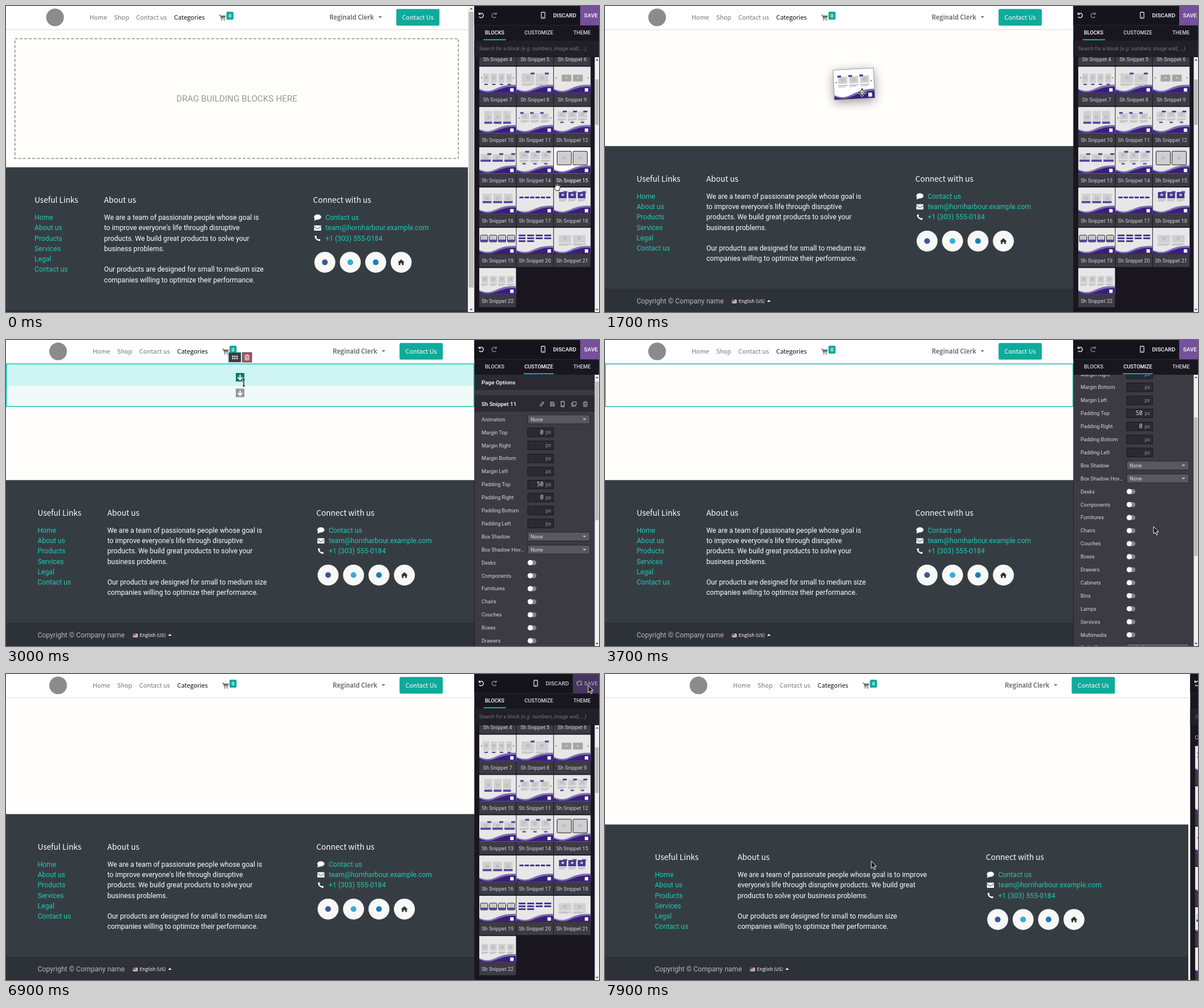
These frames come from a looping animation (1040x538 px, 8 s). An HTML page:

```html
<!DOCTYPE html>
<html lang="en">
<head>
<meta charset="utf-8">
<title>Website builder</title>
<style>
html, body { margin: 0; width: 100%; height: 100%; overflow: hidden; background: #fffefc; }
#stage { display: block; width: 100vw; height: 100vh; font-family: Roboto, "Liberation Sans", sans-serif; }
#stage text { white-space: pre; }
.alt { font-family: "Noto Sans CJK JP", "Noto Sans CJK SC", "Noto Sans CJK KR", "Noto Sans CJK TC", "Open Sans", sans-serif; }
.mono { font-family: "Noto Sans Mono", "DejaVu Sans Mono", monospace; }
</style>
</head>
<body>
<svg id="stage" viewBox="0 0 1040 538" preserveAspectRatio="none"></svg>
<script>
const LOOP = 8000, STEP = 100;
const TEAL = '#1dc9b7', BTN = '#0fab9a', BASE = '#3c3a43', BAR = '#2b2a32', FIELD = '#595762';
const stage = document.getElementById('stage');

// Drawing helpers
const rect = (x, y, w, h, fill, more = '') =>
  `<rect x="${x}" y="${y}" width="${w}" height="${h}" fill="${fill}" ${more}/>`;
const circle = (x, y, r, fill, more = '') => `<circle cx="${x}" cy="${y}" r="${r}" fill="${fill}" ${more}/>`;
const path = (d, fill, more = '') => `<path d="${d}" fill="${fill}" ${more}/>`;
const line = (d, color, w = 1, more = '') => path(d, 'none', `stroke="${color}" stroke-width="${w}" ${more}`);
const text = (x, y, s, size, fill, more = '') =>
  `<text x="${x}" y="${y}" font-size="${size}" fill="${fill}" ${more}>${s}</text>`;
const group = (x, y, body, more = '') => `<g transform="translate(${x} ${y}) ${more}">${body}</g>`;
const caret = (x, y, color, up = 0) => path(`M${x - 3.2} ${y + (up ? 1.5 : -1.5)}h6.4l-3.2 ${up ? -3.2 : 3.2}z`, color);
const view = (x, y, w, h, dy, body) =>
  `<svg x="${x}" y="${y}" width="${w}" height="${h}" viewBox="${x} ${y + dy} ${w} ${h}">${body}</svg>`;
const range = n => [...Array(n).keys()];
const mix = (a, b, k) => a + (b - a) * k;

// Keys are [time, ...values]; values run linearly between them
function track(keys, t) {
  const i = keys.findIndex(k => k[0] > t);
  if (i === 0) return keys[0].slice(1);
  if (i < 0) return keys[keys.length - 1].slice(1);
  const a = keys[i - 1], b = keys[i], k = (t - a[0]) / (b[0] - a[0]);
  return a.slice(1).map((v, j) => mix(v, b[j + 1], k));
}
const latest = (keys, t) => keys.filter(k => k[0] <= t).pop()[1];

// Timeline
const POINTER = [
  [300, 967, 318], [600, 945, 140], [800, 928, 196], [1000, 928, 196], [1300, 790, 165],
  [1600, 505, 153], [1700, 451, 152], [1900, 443, 135], [2100, 440, 131], [2300, 440, 131],
  [2400, 417, 78], [2500, 417, 78], [2600, 417, 75], [3000, 417, 75], [3400, 962, 328],
  [4100, 962, 328], [4400, 927, 369], [4600, 927, 369], [4900, 927, 391], [5100, 927, 391],
  [5400, 928, 415], [5500, 928, 415], [5900, 1002, 118], [6000, 1002, 118], [6300, 1021, 24],
  [6400, 1021, 24], [6500, 1021, 20], [6900, 1021, 20], [7400, 467, 329]
];
const SHAPE = [[0, 'grab'], [1100, 'move'], [1800, 'arrow'], [2600, 'resize'], [3100, 'arrow'],
  [4300, 'hand'], [5700, 'arrow'], [6300, 'hand'], [6800, 'arrow']];
const SCROLL = [[3400, 0], [3500, 54], [3600, 54], [3700, 125], [3800, 215], [3900, 290], [4000, 323.5]];

// Mouse pointers
const outline = 'stroke="#111" stroke-width="1" stroke-linejoin="round"';
const HEADS = 'M0-8l3 3.5h-6zM0 8l3-3.5h-6z';
const POINTERS = {
  arrow: path('M0 0V12.6L3 10L5 14.8L7.2 13.8L5.1 9.2H9Z', '#111', 'stroke="#fff" stroke-width="1"'),
  hand: group(-6, -7, path('M3 0C4 0 4.5.8 4.5 2V5.5L6 5.2 7.5 6 9 5.9 10.4 7 11.3 8V11L9.7 14.5H4L0 9.6C-.3 8.5 1 8 2 9V2C2 .8 2.2 0 3 0Z', '#fff', outline)
    + line('M6 6v3M8 6.4v3M10 7.2v2.4', '#111', .7)),
  grab: group(-5.5, -7, path('M3 13.6L0 8.5C0 7 1 6.7 2 7.6L1.2 3C1.2 1.7 2.7 1.6 3 2.8L3.8 5.6 4 1.2C4 0 5.4 0 5.7 1.2L6 5.4 7 1.7C7.3.6 8.7 1 8.5 2.2L8.1 6 9.5 3.8C10 2.8 11.3 3.4 10.9 4.6L9.7 9.5 8.7 13.6Z', '#fff', outline)),
  move: path(HEADS, '#111', 'stroke="#fff" stroke-width=".8"') + `<g transform="rotate(90)">${path(HEADS, '#111', 'stroke="#fff" stroke-width=".8"')}</g>`
    + circle(0, 0, 4, '#fff', outline) + line('M-2-1v3M0-2v4M2-1v3', '#111', .8),
  resize: line('M0-5V5', '#fff', 3.2) + path(HEADS, '#111', 'stroke="#fff" stroke-width=".7"') + line('M0-5V5', '#111', 1.5)
};

// Block thumbnails: count, width, top, height, and marks
// i icon, t/l tag at top right/left, b base bar, u tag below, n lines below,
// o outlined, p purple, d dark, g grey ground, a side arrows, r three rows
const BLOCKS = `3 16 13 11 ilba|3 13 13 13 i|3 14 10 18 ibg|2 22 13 13 itn|4 10 13 12 iba|3 15 12 11 itu
4 10.5 12 16 iua|2 22 12 16 itn|2 17 14 12 ida|3 13.5 7 23 ib|3 14.5 11 11 ilna|3 15 8 11 itnu
3 18 12 14 itb|3 16 8 13 itnu|2 25 7 24 io|3 15.5 11 17 ib|6 7.4 16 3 p|3 13.5 8 11 pint
4 12.8 13 12 iob|4 12 12 3 pr|2 22 13 13 in|4 12 14 12 in`.split(/[|\n]/).map(s => s.split(' '));

function card(x, y, w, h, has) {
  const mid = x + w / 2, purple = '#51429a', bar = (dx, dy, bw, bh, c = purple) => rect(x + dx, y + dy, bw, bh, c);
  let s = rect(x, y, w, h, has('p') ? '#46358f' : has('d') ? '#a5a5a5' : has('g') ? '#f3f3f3' : '#cfcfd1',
    has('o') ? 'rx="1.5" stroke="#222" stroke-width="1"' : '');
  if (has('i')) s += rect(mid - 2, y + h / 2 - 2.2, 4, 3.4, '#eee', 'stroke="#8d8d90" stroke-width=".6"') + circle(mid, y + h / 2 - .5, .7, '#777');
  if (has('t')) s += bar(w - 6, -1.5, 7, 3);
  if (has('l')) s += bar(-1, -2, 6, 3);
  if (has('b')) s += bar(0, h - 4, w, 3.4);
  if (has('n')) s += bar(0, h + 2, w, 1.3, '#aaaab0') + bar(0, h + 4.3, w * .75, 1.1, '#bbbbc0');
  if (has('u')) s += bar(w / 2 - 3, h + (has('n') ? 7 : 2), 6, 2.2);
  return s;
}

function thumb(i, ground) {
  const [n, w, y, h] = BLOCKS[i].map(Number), has = c => BLOCKS[i][4].includes(c);
  const gap = n > 5 ? 2 : 3, x0 = (64.4 - n * w - (n - 1) * gap) / 2;
  let s = rect(0, 0, 64.4, 46, has('g') ? '#cacaca' : ground);
  s += path('M0 39C9 43 17 44 27 39.5S47 31 64.4 32V46H0Z', '#7d6daf');
  s += path('M0 41C10 46 18 46 29 42S49 34 64.4 35.5V46H0Z', '#391f7c');
  for (const k of range(n)) {
    for (const j of range(has('r') ? (k < 2 ? 3 : 2) : 1)) s += card(x0 + k * (w + gap), y + j * 5, w, h, has);
  }
  if (has('a')) s += path('M5 18l-2 1.5 2 1.5zM59.5 18l2 1.5-2 1.5z', '#666');
  return s + rect(54.3, 37.8, 6, 6, '#fff');
}

// Page
const NARROW = ['We are a team of passionate people whose goal is', 'to improve everyone\'s life through disruptive',
  'products. We build great products to solve your', 'business problems.', '',
  'Our products are designed for small to medium size', 'companies willing to optimize their performance.'];
const WIDE = ['We are a team of passionate people whose goal is to improve', 'everyone\'s life through disruptive products. We build great',
  'products to solve your business problems.', '', 'Our products are designed for small to medium size',
  'companies willing to optimize their performance.'];

function header(p) {
  const { L, R } = p, nav = (x, s, c) => text(L + x, 24.3, s, 10.92, c, 'class="alt"');
  return rect(0, 0, p.W, 41, '#fff') + rect(0, 41, p.W, 1, '#e4e4e4') + rect(0, 42, p.W, 1, '#f6f5f4')
    + circle(L + 36, 20, 15.5, '#8b8b8b')
    + nav(96.5, 'Home', '#777') + nav(139.5, 'Shop', '#777') + nav(178.3, 'Contact us', '#777') + nav(244.8, 'Categories', '#111')
    + group(L + 323.5, 15, line('M0 .8H2.3L4.2 7.5H10.3', '#6f6f6f', 1.2) + path('M2.6 1.8H11.8L10.6 6H3.8Z', '#6f6f6f') + circle(4.8, 9.6, 1.1, '#6f6f6f') + circle(9.6, 9.6, 1.1, '#6f6f6f'))
    + rect(L + 336.5, 10, 12.5, 14, BTN, 'rx="2"') + text(L + 342.8, 20.2, '0', 8.2, '#fff', 'class="alt" font-weight="700" text-anchor="middle"')
    + text(R - 193, 24.3, 'Reginald Clerk', 10.92, '#737373', 'class="alt" font-weight="700"') + caret(R - 104, 19.5, '#737373')
    + rect(R - 75.8, 5.2, 75.8, 29.4, BTN, 'rx="2.5"') + text(R - 38, 24.3, 'Contact Us', 10.92, '#fff', 'class="alt" text-anchor="middle"');
}

function footer(p) {
  const { top, cols: [a, b, c] } = p, head = (x, s) => text(x, top + 62.7, s, 13.65, '#fff', 'class="alt"');
  const row = (x, i, s, col = TEAL) => text(x, top + 92.3 + i * 18.3, s, 12.2, col);
  const mark = i => top + 88 + i * 18.3, soc = top + 167, m = c + 8;
  let s = rect(0, top, p.W, 538 - top, '#363d42') + rect(0, p.bar, p.W, 42, '#2d3138')
    + head(a, 'Useful Links') + head(b, 'About us') + head(c, 'Connect with us');
  ['Home', 'About us', 'Products', 'Services', 'Legal', 'Contact us'].forEach((t, i) => s += row(a, i, t));
  (p.wide ? WIDE : NARROW).forEach((t, i) => s += row(b, i, t, '#fff'));
  ['Contact us', 'team@hornharbour.example.com', '+1 (303) 555-0184'].forEach((t, i) => s += row(c + 21.7, i, t));
  s += `<ellipse cx="${m}" cy="${mark(0) - .5}" rx="6.3" ry="4.6" fill="#fff"/>` + path(`M${m - 5} ${mark(0) + 1}l-1 5 5-2z`, '#fff')
    + rect(m - 6.2, mark(1) - 4.2, 12.4, 9.4, '#fff', 'rx="1"') + line(`M${m - 6.2} ${mark(1) - 2}l6.2 4.2 6.2-4.2`, '#363d42', 1)
    + line(`M${m - 4} ${mark(2) - 3.5}q.5 6.5 8 7.5`, '#fff', 2.2) + circle(m - 3.3, mark(2) - 2.8, 1.8, '#fff') + circle(m + 3, mark(2) + 3.3, 1.8, '#fff');
  ['#3b5998', '#35abdc', '#1681b8', ''].forEach((col, i) => {
    const x = c + 20.7 + i * 44.6;
    s += circle(x, soc, 18.4, '#f8f8f7') + (col ? circle(x, soc, 5, col)
      : path(`M${x} ${soc - 5}l6 5.2h-1.6v4.8h-3v-3.4h-2.8v3.4h-3v-4.8h-1.6z`, '#2f3439'));
  });
  return s + text(a, p.bar + 26, 'Copyright © Company name', 12.2, '#b6b8ba')
    + rect(a + 167, p.bar + 19, 9, 7, '#d9a3ab', 'rx="2"') + rect(a + 167, p.bar + 19, 4.5, 3.6, '#55618f')
    + text(a + 179, p.bar + 25.3, 'English (US)', 8.2, '#fff', 'class="alt"') + caret(a + 232, p.bar + 21.5, '#fff', 1);
}

function pose(t) {
  if (t < 1300) return { W: 810, L: 50, R: 760.2, cols: [50, 172, 538.5], top: 283.6, bar: 534, empty: true };
  const W = t < 7700 ? 822 : track([[7700, 818], [7800, 928], [7900, 1023]], t)[0];
  const k = Math.max(0, (W - 822) / 201), wide = k > .4;
  return { W, wide, L: mix(55.4, 128, k), R: mix(766, 894.3, k), top: wide ? 264.6 : 246.3, bar: 497,
    cols: [mix(55.4, 87.4, k), mix(177.7, 232.5, k), mix(544.2, 668, k)] };
}

function page(t) {
  const p = pose(t);
  let s = rect(0, 0, 1040, 538, '#fffefc') + header(p) + footer(p);
  if (p.empty) s += rect(15.7, 57.5, 777.6, 210.5, 'none', 'stroke="#8a8a8a" stroke-width="1.5" stroke-dasharray="5.2 3"')
    + text(404.8, 168, 'DRAG BUILDING BLOCKS HERE', 15.25, '#979797', 'text-anchor="middle"')
    + scrollbar(810, 0, 12, 10, 495);
  return s + (t >= 2600 && t < 6800 ? selection(t) : '');
}

function selection(t) {
  const over = t < 3400, tools = over || t >= 6200;
  let s = '';
  if (over) s += rect(0, 42, 821, 38.5, '#cef4f3') + rect(0, 80.5, 821, 36.5, '#f0faf9')
    + group(410.5, 65.5, handle('#08796b')) + group(410.5, 93, handle('#969696'));
  s += rect(.7, 42, 820, 75, 'none', 'stroke="#17c5b9" stroke-width="1.5"');
  if (tools) {
    s += rect(390.5, 22, 21.5, 17, BASE, 'stroke="#1b9d96" stroke-width=".8"') + rect(414.5, 22, 16.5, 17, '#a15a66', 'stroke="#333" stroke-width=".8"');
    for (const i of range(6)) s += rect(396.5 + i % 3 * 3.8, 27.5 + (i > 2) * 3.8, 2.4, 2.4, '#fff');
    s += group(422.7, 30.5, bin('#fff'));
  }
  return s;
}
const handle = c => rect(-7.5, -7.5, 15, 15, c) + line('M0-4.5V4M-4 0L0 4.2L4 0', '#fff', 2);
const bin = c => line('M-4-3H4M-1.5-4.5h3M-3-2.5V4.3H3V-2.5M-1-1V3M1-1V3', c, 1);

function scrollbar(x, y, w, a, b) {
  const m = x + w / 2;
  return rect(x, y, w, 538 - y, '#f0f0f0') + rect(x + w * .12, a, w * .72, b - a, '#bdbdbd')
    + path(`M${m - 2.5} ${y + 6}h5l-2.5-2.8zM${m - 2.5} 532.5h5l-2.5 2.8z`, '#444');
}

// Side panel
function topBar(saving, hover, custom) {
  const x = saving ? -13 : 0, dim = saving ? '#a59fae' : '#fff';
  const tab = (tx, s, on) => text(tx, 50.4, s, 9.15, on ? '#fff' : '#d5d3da', 'font-weight="500"');
  const turn = 'M-3.2-2.5A4 4 0 1 1-3.5 2.5M-4-5V-1.8H-.8';
  return rect(821.3, 0, 219, 538, '#191620') + rect(821.3, 0, 219, 33.5, '#15131c') + rect(821.3, 33.5, 219, 1, '#2a2832')
    + group(833.5, 16.5, line(turn, '#fff', 1.3)) + group(856, 16.5, line(turn, '#8d8b93', 1.3), 'scale(-1 1)')
    + rect(938.8 + x, 11, 6.4, 10.6, 'none', 'rx="1.2" stroke="#ddd" stroke-width="1.3"') + rect(941 + x, 19, 2, 1.2, '#ddd')
    + text(959.4 + x, 19.8, 'DISCARD', 9.9, saving ? '#c9c7ce' : '#fff', 'font-weight="500"')
    + rect(1007 + x, 0, 46, 34, saving ? '#46355f' : hover ? '#68478b' : '#75509b')
    + text(1013.8, 19.8, 'SAVE', 9.9, dim, 'font-weight="500"')
    + (saving ? group(1005.5, 16.3, line('M-4-.8A4 4 0 0 1 3-2.7M4 .8A4 4 0 0 1-3 2.7', dim, 1.4) + path('M4.3-4.5V-1H.8zM-4.3 4.5V1H-.8z', dim), `rotate(${saving * 36})`) : '')
    + tab(840, 'BLOCKS', !custom) + tab(909.3, 'CUSTOMIZE', custom) + tab(995, 'THEME')
    + (custom ? rect(908, 58.5, 52.5, 1.7, TEAL) : rect(837.5, 58.5, 39.5, 1.7, TEAL));
}

function blocks(dy, at) {
  let s = text(829.5, 115.3 + dy, 'Category snippet', 9.15, '#d0ced6');
  for (const i of range(22)) {
    const x = 830 + i % 3 * 65.4, y = 126.7 + dy + Math.floor(i / 3) * 70.8;
    const on = at && at[0] >= x && at[0] < x + 65.4 && at[1] >= y && at[1] < y + 70;
    s += rect(x, y, 64.4, 69, BASE) + group(x, y, thumb(i, on ? '#fff' : '#e7e7e7'))
      + text(x + 32.2, y + 61.5, 'Sh Snippet ' + (i + 1), 9.15, on ? '#fff' : '#d0ced6', 'text-anchor="middle"');
  }
  const a = dy ? 129 : 102;
  return view(822, 90, 211, 448, 0, s) + rect(821.3, 61, 219, 28.5, '#211f28')
    + text(829.7, 78, 'Search for a block (e.g. numbers, image wall, ...)', 9.15, '#75727d', 'font-style="italic"')
    + scrollbar(1032.5, 90, 8, a, a + 80);
}

const ROWS = ['Animation', 'Margin Top', 'Margin Right', 'Margin Bottom', 'Margin Left', 'Padding Top', 'Padding Right',
  'Padding Bottom', 'Padding Left', 'Box Shadow', 'Box Shadow Hov…', 'Desks', 'Components', 'Furnitures', 'Chairs', 'Couches',
  'Boxes', 'Drawers', 'Cabinets', 'Bins', 'Lamps', 'Services', 'Multimedia', 'Order By', 'Description', 'Image',
  'Product Count', 'Background', 'Content Width', 'Height', 'Visibility'];
const CHOICE = { 0: 'None', 9: 'None', 10: 'None', 23: 'default', 30: 'Always visible' };
const VALUE = { 1: '0', 5: '50', 6: '0' };
const SWITCH_ON = { 24: 4700, 25: 5200, 26: 5600 };
const rowY = i => i < 28 ? 139.5 + i * 22.9 : [782, 807, 830.7][i - 28];

const select = (y, s) => rect(915, y - 7.7, 109, 15.4, FIELD, 'stroke="#1b1a20" stroke-width=".8"')
  + text(920, y + 3.2, s, 9.15, '#dedce2') + caret(1014.5, y, '#b9b7be');
const input = (y, v = '') => rect(915, y - 7.7, 45.3, 15.4, BAR, 'stroke="#121116" stroke-width=".8"')
  + text(942.8, y + 3.4, v, 9.9, '#dedce2', 'class="mono" text-anchor="end"') + text(946.5, y + 3, 'px', 9.15, '#8f8d96');
const toggle = (y, on) => rect(915, y - 4.2, 15.2, 8.6, on ? TEAL : '#85838c', 'rx="4.3"') + circle(on ? 925.6 : 919.4, y, 4.6, '#fff');
const button = (x, y, w, h, on) => rect(x, y - h / 2, w, h, on ? '#211f28' : FIELD, 'stroke="#1b1a20" stroke-width=".8"');

function background(y) {
  let s = circle(922.3, y, 7.3, '#fff') + path(`M922.3 ${y}v-5h-4v5zM922.3 ${y}v5h4v-5z`, '#cfcfcf');
  for (const i of range(3)) s += button(957 + i * 23.5, y, 20.5, 15);
  return s + rect(962, y - 3, 10, 7, '#e6e4ea', 'rx="1"') + circle(967, y + .5, 2.1, FIELD)
    + rect(985.5, y - 4, 10, 8, 'none', 'stroke="#c3c1c8" stroke-width="1.3"') + line(`M988 ${y - 4}v8M993 ${y - 4}v8M988 ${y}h5`, '#c3c1c8', .9)
    + rect(1009, y - 4, 10, 8, '#e6e4ea') + path(`M1010 ${y + 3}l3-3 1.5 1.3 3.5-3.6v5.3z`, FIELD);
}
function widths(y) {
  const s = range(3).map(i => button(915 + i * 27.2, y, 27.2, 18.5, i === 1)).join('');
  return s + rect(925.5, y - 3, 6, 6, '#fff') + line(`M919 ${y}h4M934 ${y}h4`, '#fff', 1.4)
    + rect(950.5, y - 3, 10.5, 6, '#fff') + rect(974, y - 3, 17.5, 6, '#fff') + line(`M976 ${y}h4M985 ${y}h4`, '#444', 1.2);
}
const heights = y => ['Auto', '50%', '100%'].map((v, i) => button(915 + i * 27.2, y, 27.2, 18.5, !i)
  + text(928.6 + i * 27.2, y + 3.2, v, 9.15, i ? '#d0ced6' : '#fff', 'text-anchor="middle"')).join('');

function control(i, y, t) {
  if (CHOICE[i]) return select(y, CHOICE[i]);
  if (i < 9) return input(y, VALUE[i]);
  if (i < 27) return toggle(y, t >= SWITCH_ON[i]);
  return [background, widths, heights][i - 27](y);
}

function customize(t) {
  const dy = track(SCROLL, t)[0], gray = '#b5b3ba';
  let s = rect(822, 61, 211, 27, BAR) + text(834, 78, 'Page Options', 9.9, '#fff', 'font-weight="500"')
    + rect(822, 97, 211, 1.2, '#211f28') + rect(822, 99, 211, 27, BAR) + text(834, 116.2, 'Sh Snippet 11', 9.9, '#fff', 'font-weight="500"')
    + group(939.7, 112.7, line('M-.5 1L1-.5M-1-.5L-3 1.2A1.6 1.6 0 0 0-1 3.4L.8 1.8M1 .5L3-1.2A1.6 1.6 0 0 0 1-3.4L-.8-1.8', gray, 1.1))
    + group(958.3, 112.7, line('M-3.5-3.5H2L3.5-2V3.5H-3.5ZM-2-3.5v2.5h3.5v-2.5M-2 3.5V1H2V3.5', gray, 1))
    + group(976.3, 112.7, line('M-2.7-4.5H2.7V4.5H-2.7ZM-1 3H1', gray, 1.2))
    + group(996, 112.7, line('M-2-4H4V2H-2ZM-2-2H-4V4H2V2', gray, 1)) + group(1016, 112.7, bin(gray));
  ROWS.forEach((name, i) => s += text(834, rowY(i) + 3.2, name, 9.15, '#d6d4db') + control(i, rowY(i), t));
  s += rect(822, 849.5, 211, 2, '#1b1a20') + rect(822, 851.5, 211, 30, BAR);
  return rect(822, 61, 211, 477, BASE) + view(822, 61, 211, 477, dy, s)
    + scrollbar(1032.5, 61, 8, 73 + dy * .504, 317 + dy * .504);
}

function panel(t, at) {
  const custom = t >= 2600 && t < 6800, saving = t >= 6800 && t < 7700 ? (t - 6700) / STEP : 0;
  const hover = t < 1100 && [at[0], at[1] - 4];
  const shift = track([[7700, 0], [7800, 110], [7900, 205]], t)[0];
  return group(shift, 0, topBar(saving, t >= 6300, custom) + (custom ? customize(t) : blocks(t < 7400 ? -161.6 : 0, hover)));
}

function dragged([x, y]) {
  const box = rect(0, 0, 64.4, 46, '#fff', 'style="filter:drop-shadow(0 4px 8px rgba(0,0,0,.42))"');
  return group(x - 14.5, y - 15, `<g transform="rotate(-3) scale(1.1 1.14) translate(-32.2 -23)">${box}${thumb(10, '#fff')}${rect(0, 0, 64.4, 46, 'none', 'stroke="#777" stroke-width=".6"')}</g>`);
}

function draw(t) {
  const at = track(POINTER, t), busy = t >= 7200 && t < 7700;
  let s = (t >= 7400 && t < 7700 ? rect(0, 0, 1040, 538, '#fffefc') : page(t)) + panel(t, at);
  if (busy) s = `<g style="filter:blur(1.4px)">${s}</g>` + rect(0, 0, 1040, 538, '#000', 'fill-opacity=".52"')
    + circle(521.5, 262.5, 14.5, 'none', 'stroke="#fff" stroke-width="6"');
  if (t >= 1100 && t < 1800) s += dragged(at);
  stage.innerHTML = s + group(at[0], at[1], POINTERS[latest(SHAPE, t)]);
}

const start = performance.now();
let shown = -1;
function tick() {
  const t = Math.floor((performance.now() - start) % LOOP / STEP) * STEP;
  if (t !== shown) draw(shown = t);
  requestAnimationFrame(tick);
}
tick();
</script>
</body>
</html>
```
